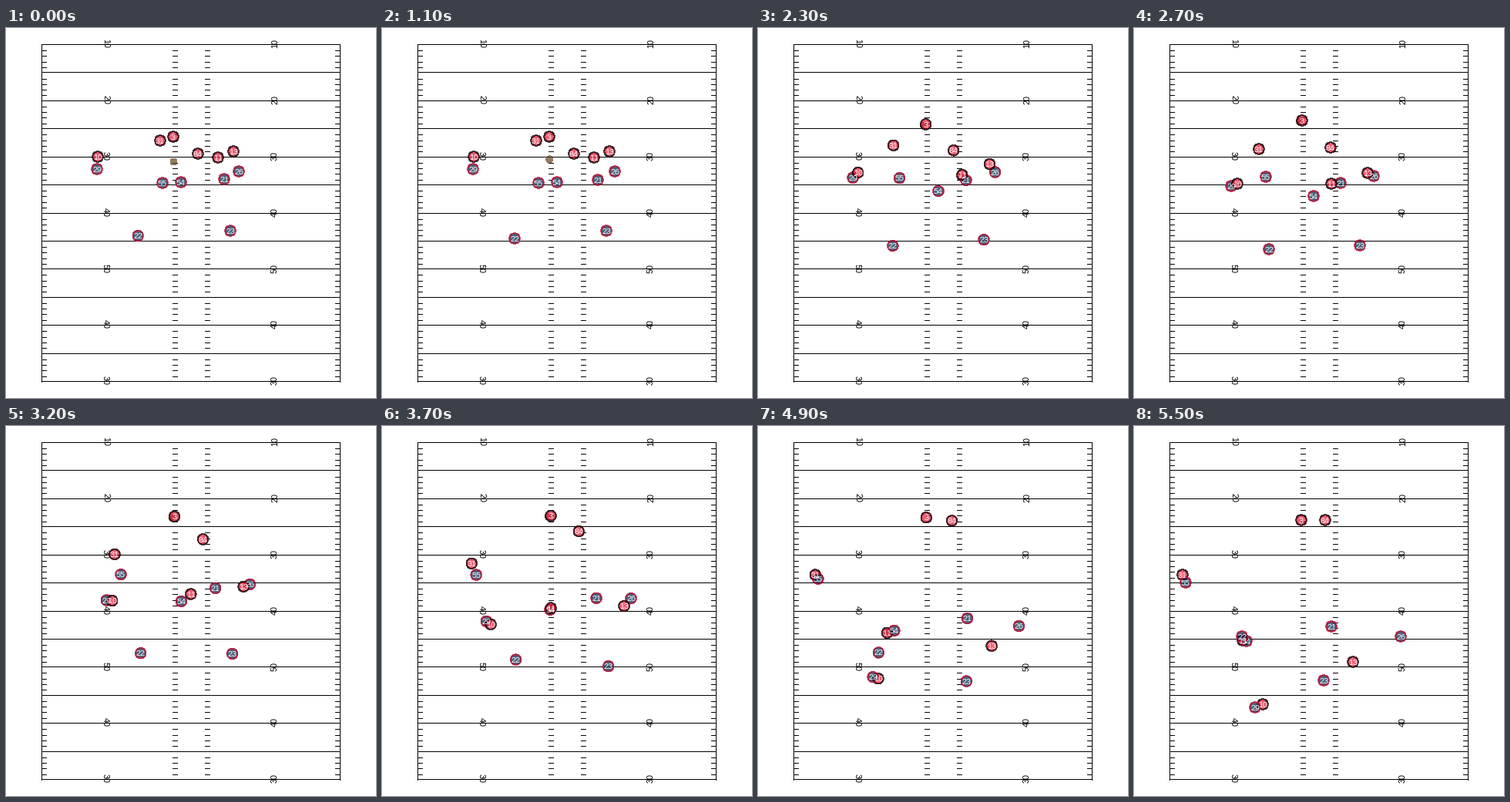
A matplotlib script that plays this animation: 480x480 px, repeating every 5.6 s.

```python
import numpy as np
import matplotlib.pyplot as plt
from matplotlib.animation import FuncAnimation
from matplotlib.patches import Circle

SIZE, DPI = 480, 72
FRAMES, STEP = 56, 100
LEFT, RIGHT, TOP, BOTTOM = 46, 433, 21, 458
YARD = (BOTTOM - TOP) / 60

plt.rcParams.update({"font.family": "Liberation Sans",
                     "text.hinting": "native", "text.hinting_factor": 1})

# Seconds of the snap count, the first break, the second break and the whistle.
TIMES = np.array([1.1, 2.7, 4.3, 5.5])

OFFENCE = {
    10: [(119, 167), (134, 202), (147, 294), (167, 361)],
    31: [(200, 146), (162, 157), (91, 189), (63, 193)],
    3: [(217, 141), (218, 120), (219, 117), (217, 122)],
    84: [(249, 163), (255, 155), (254, 127), (248, 122)],
    11: [(275, 168), (256, 202), (193, 255), (141, 278)],
    13: [(295, 160), (303, 188), (314, 262), (284, 306)],
}
DEFENCE = {
    29: [(118, 183), (126, 205), (142, 289), (157, 365)],
    55: [(203, 201), (171, 193), (95, 195), (67, 203)],
    54: [(227, 200), (233, 218), (201, 252), (146, 279)],
    21: [(280, 197), (268, 201), (280, 238), (256, 260)],
    26: [(302, 186), (311, 192), (331, 244), (346, 273)],
    22: [(172, 273), (175, 287), (168, 305), (140, 273)],
    23: [(291, 263), (293, 282), (287, 326), (246, 330)],
}
CREEPERS = (21, 22)  # already moving before the snap


class Route:
    """Smooth curve through the key points, starting from rest."""

    def __init__(self, points, creep):
        self.points = np.array(points, float)
        self.slopes = np.gradient(self.points, TIMES, axis=0, edge_order=2)
        self.slopes[0] = 0
        self.lead = creep * (self.points[0] - self.points[1])

    def at(self, t):
        if t <= TIMES[0]:
            return self.points[0] + self.lead * max(1 - t / 0.8, 0)
        i = min(np.searchsorted(TIMES, t, side="right"), len(TIMES) - 1) - 1
        h = TIMES[i + 1] - TIMES[i]
        u = (t - TIMES[i]) / h
        p, q = self.points[i:i + 2]
        a, b = self.slopes[i:i + 2] * h
        return ((1 + 2 * u) * (1 - u) ** 2 * p + u * (1 - u) ** 2 * a
                + u * u * (3 - 2 * u) * q + u * u * (u - 1) * b)


ROUTES = {n: Route(points, 0.25 if n in CREEPERS else 0)
          for n, points in {**OFFENCE, **DEFENCE}.items()}
PASSER, CATCHER = ROUTES[3], ROUTES[11]

SNAP, IN_HAND, RELEASE, CATCH = 1.0, 1.55, 3.7, 4.62
SPOT, HOLD = np.array((217.5, 173.5)), np.array((-3, 1.5))


def ball_at(t):
    if t < IN_HAND:
        u = max(t - SNAP, 0) / (IN_HAND - SNAP)
        return SPOT + (PASSER.at(IN_HAND) + HOLD - SPOT) * u ** 1.4
    if t <= RELEASE:
        return PASSER.at(t) + HOLD
    if t < CATCH:
        start, end = PASSER.at(RELEASE) + HOLD, CATCHER.at(CATCH)
        return start + (end - start) * (t - RELEASE) / (CATCH - RELEASE)
    return CATCHER.at(t)


fig = plt.figure(figsize=(SIZE / DPI, SIZE / DPI), dpi=DPI, facecolor="white")
ax = fig.add_axes((0, 0, 1, 1))
ax.set(xlim=(0, SIZE), ylim=(SIZE, 0))
ax.axis("off")


def draw_field():
    # Whole-number coordinates snap to crisp single-pixel lines.
    line = dict(colors="black", linewidths=1, antialiased=False)
    yards = np.arange(61)
    rows = TOP + yards * YARD
    ax.hlines(np.floor(rows[::5] + 0.5), LEFT, RIGHT, **line)
    ax.vlines((LEFT, RIGHT), TOP, BOTTOM + 1, **line)
    for x in (LEFT, 216, 258, RIGHT - 6):
        ax.hlines(np.floor(rows[yards % 5 > 0] + 1.3), x, x + 6, **line)
    for row, label in zip(rows[::10], (10, 20, 30, 40, 50, 40, 30)):
        for x, angle in ((126, 270), (352, 90)):
            ax.text(x, row - 0.7, str(label), size=11.4, rotation=angle,
                    rotation_mode="anchor", ha="center", va="baseline")


def add_disc(radius, fill, edge, zorder):
    return ax.add_patch(Circle((0, 0), radius, facecolor=fill, edgecolor=edge,
                               linewidth=1, alpha=0.7, zorder=zorder,
                               antialiased=False))


draw_field()
ball = add_disc(4.4, "#654321", "none", 3)
discs, labels = {}, {}
for n in ROUTES:
    fill, edge = ("#e31837", "black") if n in OFFENCE else ("#002244", "#c60c30")
    discs[n] = add_disc(6.75, fill, edge, 5)
    labels[n] = ax.text(0, 0, str(n), color="white", size=10, ha="center",
                        va="baseline", zorder=8)


def update(frame):
    t = frame * STEP / 1000
    ball.center = tuple(ball_at(t))
    for n, route in ROUTES.items():
        x, y = route.at(t)
        discs[n].center = (x, y)
        labels[n].set_position((x, y + 3.6))
        if n in DEFENCE:
            discs[n].set_zorder(4 if t < 4 else 6)
    return [ball, *discs.values(), *labels.values()]


anim = FuncAnimation(fig, update, frames=FRAMES, interval=STEP,
                     repeat=True, repeat_delay=0, blit=False)
plt.show()
```
